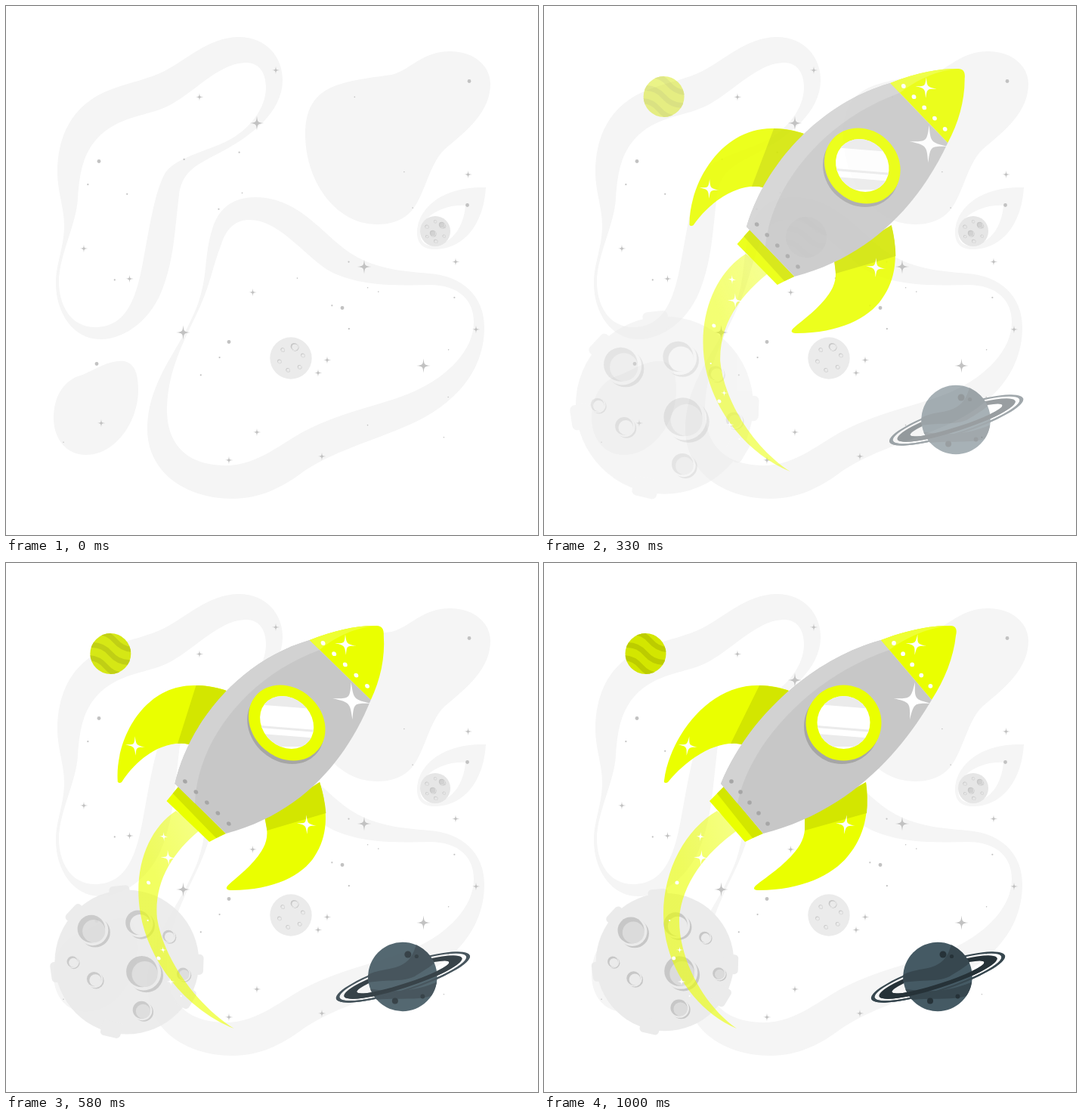
Animation of 704 by 700 pixels, one loop 1.04 s. Source, as an HTML page:

```html
<!DOCTYPE html>
<html lang="en">
<head>
<meta charset="utf-8">
<title>Rocket</title>
<style>
html, body { margin: 0; width: 100%; height: 100%; overflow: hidden; background: #fff }
svg { display: block; width: 704px; height: 700px }
</style>
</head>
<body>
<svg viewBox="0 0 704 700">
  <defs>
    <path id="spark" d="M0-1C.1-.1 .1-.1 1 0C.1 .1 .1 .1 0 1C-.1 .1-.1 .1-1 0C-.1-.1-.1-.1 0-1Z"/>
    <clipPath id="pane"><circle cx="396.5" cy="211" r="35"/></clipPath>
    <clipPath id="globe"><circle cx="521" cy="547.5" r="45.7"/></clipPath>
    <clipPath id="ball"><circle r="27"/></clipPath>
    <clipPath id="front"><rect x="-100" width="200" height="40"/></clipPath>
    <linearGradient id="fire" x1="1" y1="0" x2=".4" y2=".45">
      <stop offset=".2" stop-color="#eaff00" stop-opacity=".5"/>
      <stop offset="1" stop-color="#eaff00" stop-opacity=".62"/>
    </linearGradient>
    <g id="rings" fill="none"></g>
    <g id="waves" clip-path="url(#ball)" fill="none" stroke-width="7"></g>
  </defs>

  <g fill="#f5f5f5" fill-rule="evenodd">
    <path d="M308 41C345 41 366 68 366 98C366 140 325 172 285 193C255 209 233 217 229 250C223 300 222 335 208 372C194 412 160 441 125 441C88 441 66 405 66 367C66 340 77 320 77 290C77 268 68 245 68 220C68 175 85 130 140 110C165 101 190 96 210 86C240 70 270 41 308 41ZM318 75C336 75 344 90 344 108C344 135 322 165 290 180C262 193 222 202 210 222C195 250 188 305 180 345C172 385 160 425 118 425C85 425 70 395 70 365C70 330 93 290 95 255C97 220 103 195 120 176C148 145 185 147 215 132C250 114 282 75 318 75Z"/>
    <path d="M588 60C620 60 641 80 641 103C641 140 610 165 580 190C562 208 556 240 543 262C533 280 515 289 491 289C435 289 396 230 396 170C396 130 413 113 440 104C465 96 490 94 510 91C535 85 550 60 588 60Z"/>
    <path d="M635 240C632 290 605 322 567 322C550 322 544 312 544 300C544 270 575 238 635 240ZM608 264C606 290 592 314 567 317C552 318 548 310 548 300C550 278 580 262 608 264Z"/>
    <path d="M330 253C380 253 410 290 440 315C475 345 510 350 560 354C605 357 633 385 633 425C633 490 585 535 520 560C470 580 430 592 395 615C365 638 335 652 300 652C235 652 187 615 187 560C187 500 225 460 245 415C270 365 260 335 273 295C282 265 303 253 330 253ZM322 283C360 283 390 325 425 349C465 372 520 370 560 369C600 369 619 390 619 418C619 455 585 490 540 510C500 528 450 535 400 560C365 577 335 608 290 608C240 608 213 580 213 535C213 480 240 435 258 395C270 368 275 340 285 315C292 293 305 283 322 283Z"/>
    <path d="M157 470C172 474 175 490 175 508C175 550 145 594 106 594C80 594 63 573 63 545C63 518 75 498 95 490C115 484 135 467 157 470Z"/>
  </g>
  <g id="rock" transform="translate(568 298)"><circle r="20" fill="#e6e6e6"/></g>
  <g id="pebble" transform="translate(377 466)"><circle r="27.7" fill="#ebebeb"/></g>
  <g id="sky" fill="#c2c2c2"></g>

  <g id="moon" fill="#ebebeb"><circle cx="160" cy="528" r="91.3"/></g>

  <g id="hidden"><g transform="translate(323 306)"><circle r="27" fill="#c7c7c7"/><use href="#waves" stroke="#b2b2b2"/></g></g>

  <g id="lime"><g transform="translate(134.5 120)"><circle r="27" fill="#d3e600"/><use href="#waves" stroke="#bccc00"/></g></g>

  <g id="saturn">
    <use href="#rings" transform="translate(521.5 548) rotate(-18)"/>
    <circle cx="521" cy="547.5" r="45.7" fill="#455a64"/>
    <g clip-path="url(#globe)" fill="#37474f">
      <path d="M540 500C536 520 528 530 512 535C498 539 485 538 470 548L470 556C500 550 525 556 540 545C555 536 565 530 570 520Z"/>
      <path d="M470 563C500 566 525 572 570 553L562 572C540 580 510 574 480 579Z"/>
    </g>
    <g transform="translate(521.5 548) rotate(-18)"><use href="#rings" clip-path="url(#front)"/></g>
  </g>

  <g id="rocket">
    <path fill="url(#fire)" d="M229 328C188 352 158 405 158 465C158 530 198 592 255 616C212 586 178 525 179 470C183 423 214 383 258 352Z"/>
    <g fill="#eaff00">
      <path d="M219 315L238 296L289 358L266 369Z"/>
      <path d="M159 288C165 235 215 160 285 162C300 162 314 165 324 169L262 240C230 233 190 258 164 290C161 292 158 291 159 288Z"/>
      <path d="M345 338C347 358 342 370 333 381C317 401 296 414 280 427C276 431 278 433 285 433C340 433 382 413 402 388C424 362 431 330 426 290Z"/>
    </g>
    <g fill="#d3e600">
      <path d="M229 305L238 296L290 358L276 364Z"/>
      <path d="M285 162C300 162 315 166 324 169L262 240Q254 238 247 239Z"/>
      <path d="M345 336L345 354L427 331Q429 310 426 290Z"/>
    </g>
    <path fill="#c7c7c7" d="M234 292C265 215 345 130 446 102L513 181C470 255 400 330 290 358Z"/>
    <path fill="#d2d2d2" d="M234 292C265 215 345 130 446 102L457 115C350 152 272 240 256 318Z"/>
    <path fill="#eaff00" d="M446 102C480 89 515 82 538 83C545 83 547 88 545 96C542 125 530 155 513 181Z"/>
    <path fill="#eeff33" d="M446 102C480 89 515 82 538 83C510 85 480 98 457 115Z"/>
    <circle cx="394" cy="216" r="50" fill="#a6a6a6"/>
    <circle cx="396.5" cy="211.5" r="50" fill="#eaff00"/>
    <circle cx="396.5" cy="211" r="35" fill="#fff"/>
    <path clip-path="url(#pane)" fill="#ebebeb" d="M360 187L434 193V170H360ZM360 215L434 221V224L360 218ZM360 226L434 232V243H360Z"/>
  </g>
</svg>
<script>
const $ = id => document.getElementById(id);
const add = (id, html) => $(id).insertAdjacentHTML('beforeend', html);
const loop = (n, part) => Array.from({ length: n }, (_, i) => part(i)).join('');
const disc = (x, y, r, fill = 'inherit') => `<circle cx="${x}" cy="${y}" r="${r}" fill="${fill}"/>`;
const spark = (x, y, r, turn = 0) => `<use href="#spark" transform="translate(${x} ${y}) rotate(${turn}) scale(${r})"/>`;
const sparks = (r, points) => points.map(([x, y]) => spark(x, y, r)).join('');

// Shadow crescents on two sides; the floor shows inside.
const crater = (x, y, r, floor = '#ebebeb', base = '#ebebeb') =>
  disc(x + .26 * r, y + .23 * r, r, '#c7c7c7') + disc(x + .1 * r, y + .08 * r, 1.03 * r, base) +
  disc(x, y, .92 * r, '#c7c7c7') + disc(x + .17 * r, y + .15 * r, .76 * r, floor);

const craterRing = (n, radius, start, size, base) => loop(n, i => {
  const a = start + i * 2 * Math.PI / n;
  return crater(radius * Math.cos(a), radius * Math.sin(a), size(i), base, base);
});

let seed = 7;
const random = () => (seed = seed * 16807 % 2147483647) / 2147483647;

add('pebble', craterRing(6, 16, -1.3, i => i ? 2.6 : 5, '#ebebeb'));
add('rock', craterRing(6, 13, .5, i => 2 + i % 2 * .5, '#e6e6e6') +
  crater(8.5, -8.5, 4, '#d2d2d2', '#e6e6e6') + crater(-3.5, 2.5, 4, '#d2d2d2', '#e6e6e6'));

add('sky',
  sparks(9.5, [[332, 155], [474, 345], [234.5, 432], [552.5, 476]]) +
  sparks(5.2, [[357, 85], [256, 120.5], [103, 321], [163.5, 361], [326.5, 379], [425, 468.5], [413, 485.5],
    [622, 428], [595, 338.5], [611.5, 223], [126, 552], [332, 564], [295, 601], [418, 596]]) +
  [[123, 205.5], [613, 99.5], [610.5, 263.5], [295, 444.5], [445, 399.5], [120, 473.5]].map(p => disc(...p, 2.4)).join('') +
  loop(24, i => disc(76 + 552 * random(), 92 + 527 * random(), .8 + i % 2 * .3)));

add('moon', [-98, -47, -6, 92, 121, 193].map(turn =>
  `<rect x="-13" y="-97" width="26" height="20" rx="5" transform="translate(160 528) rotate(${turn})"/>`).join(''));
const pit = '#dbdbdb';
add('moon', crater(115, 486, 19, pit) + crater(179, 540, 21.5, pit) + crater(231, 543, 8.5, pit) + crater(178.5, 588.5, 12, pit) +
  crater(174, 478, 17) + crater(212.5, 495, 8) + crater(91, 527.5, 7.5) + crater(118.5, 549.5, 10));

add('waves', loop(3, i => `<path d="M-32 ${18 * i - 18}q16-9 32 0t32 0" transform="rotate(20)"/>`));
add('saturn', `<g fill="#263238">${disc(528, 518, 4.5) + disc(539.5, 520.5, 2.6) + disc(511, 579.5, 4) + disc(547.5, 573.5, 2.9)}</g>`);

const ellipse = (a, b) => `M${-a} 0A${a} ${b} 0 0 1 ${a} 0A${a} ${b} 0 0 1 ${-a} 0Z`;
const band = (outer, inner, fill) => `<path fill="${fill}" fill-rule="evenodd" d="${ellipse(...outer) + ellipse(...inner)}"/>`;
add('rings', band([93, 18.5], [88, 16.3], '#37474f') + band([82, 14.3], [64, 8.8], '#263238'));

add('rocket',
  loop(5, i => disc(248 + 12 * i, 289 + 14 * i, 2.8, '#a6a6a6') + disc(463 + 12.1 * i, 106 + 14.2 * i, 2.9, '#fff')) +
  `<g fill="#fff">${spark(190.5, 242, 13, 8) + spark(399, 346, 13, 8) + spark(492.5, 108, 14, 8) + spark(487.5, 182.5, 25, 8) +
    spark(208, 390, 10, 5) + spark(207, 362, 6, 5) + spark(179.5, 512, 4.5) + spark(182, 554, 5.5) +
    loop(4, i => disc(166 + (50 * i - 57) ** 2 / 325, 423 + 50 * i, i % 2 ? 1.1 : 2.5))}</g>`);

const mix = (a, b, p) => a + (b - a) * p;
const skew = deg => Math.tan(deg * Math.PI / 180);

// cubic-bezier(.36, -.01, .5, 1.38)
function ease(x) {
  if (x >= 1) return 1;
  const at = (s, a, b) => 3 * (1 - s) ** 2 * s * a + 3 * (1 - s) * s * s * b + s ** 3;
  let lo = 0, hi = 1;
  for (let i = 0; i < 24; i++) {
    const mid = (lo + hi) / 2;
    if (at(mid, .36, .5) < x) lo = mid; else hi = mid;
  }
  return at(lo, -.01, 1.38);
}

function pose(id, opacity, transform) {
  $(id).setAttribute('opacity', Math.max(0, Math.min(1, opacity)));
  $(id).setAttribute('transform', transform);
}

function render() {
  // 24 steps a second
  const step = Math.min(24, Math.floor((performance.now() % 1040 + 5) * .024));
  const on = step > 1;
  const x = step / 24 + .016;

  const p = ease(x);
  const fade = on ? .07 + .93 * p : 0;
  for (const id of ['hidden', 'lime', 'saturn']) pose(id, fade, `translate(${42 * (1 - p)} 0)`);
  pose('moon', fade, `translate(162 527) scale(${1.5 - .5 * p}) translate(-162 -527)`);

  const enter = ease(x / .6);
  const lean = x < .6 ? mix(skew(-20), skew(10), enter)
    : x < .8 ? mix(skew(10), skew(-2), ease((x - .6) / .2))
    : mix(skew(-2), 0, ease((x - .8) / .2));
  pose('rocket', on ? enter : 0, `matrix(1 0 ${lean} 1 ${350 * (1 - enter - lean)} 0)`);
  requestAnimationFrame(render);
}
render();
</script>
</body>
</html>
```
